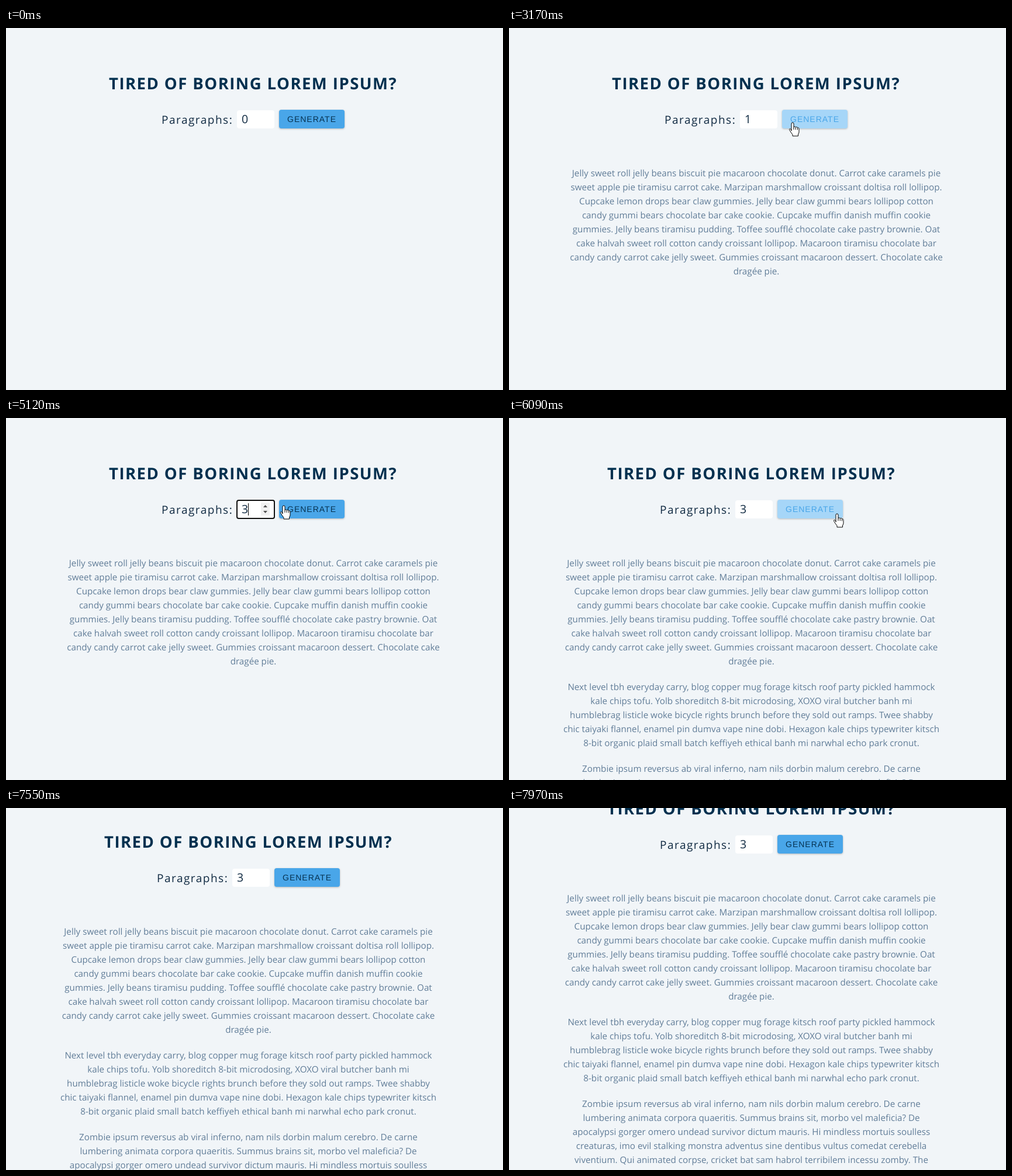
Animation, 850 px wide and 620 px high, one loop 8000 ms. Source, as an HTML page:

```html
<!DOCTYPE html>
<html lang="en">
<head>
<meta charset="utf-8">
<title>Paragraph generator</title>
<style>
  html, body { margin: 0; width: 100%; height: 100%; overflow: hidden; background: #f1f5f8; }
  svg { display: block; width: 850px; height: 620px; background: #f1f5f8; }
  text { font-family: "Open Sans", "Noto Sans", sans-serif; fill: #102a42; text-rendering: geometricPrecision; white-space: pre; }
  .title { font-size: 27.5px; font-weight: 700; letter-spacing: 1.46px; fill: #02304f; }
  .label { font-size: 19px; letter-spacing: 1.5px; }
  .value { font-size: 19.5px; }
  .caption { font: 14px "Liberation Sans", Arial, sans-serif; letter-spacing: 1px; }
  .para text { font-size: 15.2px; fill: #617d98; text-anchor: middle; }
  #button { filter: drop-shadow(0 1px 1.5px rgba(0, 0, 0, .25)); }
  .cursor { fill: #fff; stroke: #000; stroke-width: 1; stroke-linejoin: round; }
</style>
</head>
<body>
<svg viewBox="0 0 850 620">
  <g id="page">
    <text class="title" x="176" y="105">TIRED OF BORING LOREM IPSUM?</text>
    <text class="label" x="266" y="164">Paragraphs:</text>
    <rect x="395" y="141" width="64" height="31" rx="4" fill="#fff"/>
    <text class="value" id="value" x="403" y="163">0</text>
    <g id="spin">
      <rect x="436" y="145" width="15" height="22" fill="#f0f0f0"/>
      <rect id="half" x="436" width="15" height="11" fill="#dcdcdc"/>
      <path d="M440 153l3.5-4 3.5 4zM440 159l3.5 4 3.5-4z" fill="#505050"/>
    </g>
    <g id="focus">
      <rect x="395" y="141" width="64" height="31" rx="3" fill="none" stroke="#101010" stroke-width="2"/>
      <path id="caret" d="M414.5 146v21" stroke="#000"/>
    </g>
    <rect id="button" x="467" y="140" width="112" height="32" rx="4"/>
    <text class="caption" id="caption" x="481" y="161">GENERATE</text>
    <g id="paras"></g>
  </g>
  <circle id="glow" r="12" fill="#ff0" fill-opacity=".58"/>
  <g id="pointer" class="cursor">
    <path id="arrow" d="M.5.5V16.4L4.1 13l2.5 5.6 2.2-1L6.3 12.1H11.4z"/>
    <g id="hand">
      <path d="M-2 14V2a2 2 0 0 1 4 0v6a1.7 1.7 0 0 1 3.3.4 1.7 1.7 0 0 1 3.2.8 1.5 1.5 0 0 1 2.5 1.2V16q0 2-1.5 4v3H0v-2.5q-2.5-3-4.8-7-1.5-2.5 0-3 1.2-.3 2.8 2.5z"/>
      <path d="M2 8v4M5.3 8.6v3.6M8.5 9.4v3" fill="none"/>
    </g>
  </g>
</svg>
<script>
const LOOP = 8000;
const $ = id => document.getElementById(id);

const paragraphs = [
  [254, `Jelly sweet roll jelly beans biscuit pie macaroon chocolate donut. Carrot cake caramels pie
sweet apple pie tiramisu carrot cake. Marzipan marshmallow croissant doltisa roll lollipop.
Cupcake lemon drops bear claw gummies. Jelly bear claw gummi bears lollipop cotton
candy gummi bears chocolate bar cake cookie. Cupcake muffin danish muffin cookie
gummies. Jelly beans tiramisu pudding. Toffee soufflé chocolate cake pastry brownie. Oat
cake halvah sweet roll cotton candy croissant lollipop. Macaroon tiramisu chocolate bar
candy candy carrot cake jelly sweet. Gummies croissant macaroon dessert. Chocolate cake
dragée pie.`],
  [466, `Next level tbh everyday carry, blog copper mug forage kitsch roof party pickled hammock
kale chips tofu. Yolb shoreditch 8-bit microdosing, XOXO viral butcher banh mi
humblebrag listicle woke bicycle rights brunch before they sold out ramps. Twee shabby
chic taiyaki flannel, enamel pin dumva vape nine dobi. Hexagon kale chips typewriter kitsch
8-bit organic plaid small batch keffiyeh ethical banh mi narwhal echo park cronut.`],
  [606, `Zombie ipsum reversus ab viral inferno, nam nils dorbin malum cerebro. De carne
lumbering animata corpora quaeritis. Summus brains sit, morbo vel maleficia? De
apocalypsi gorger omero undead survivor dictum mauris. Hi mindless mortuis soulless
creaturas, imo evil stalking monstra adventus sine dentibus vultus comedat cerebella
viventium. Qui animated corpse, cricket bat sam habrol terribilem incessu zomby. The`]
];

const NS = "http://www.w3.org/2000/svg";
function add(parent, tag, attrs, content = "") {
  const el = document.createElementNS(NS, tag);
  for (const key in attrs) el.setAttribute(key, attrs[key]);
  el.textContent = content;
  return parent.appendChild(el);
}

const blocks = paragraphs.map(([top, copy]) => {
  const block = add($("paras"), "g", { class: "para" });
  copy.split("\n").forEach((line, i) => add(block, "text", { x: 423, y: top + 24 * i }, line));
  return block;
});

// Pointer moves: first step, last step, step count, end point, optional bend
const START = [705, 511];
const moves = [
  [130, 200, 2, 571, 313],
  [460, 540, 2, 473, 192],
  [720, 920, 4, 450, 156],
  [1060, 1350, 5, 445, 155],
  [2080, 2500, 7, 487, 160],
  [3170, 3170, 1, 485, 162],
  [3240, 3930, 10, 443, 158, 478, 200],
  [3990, 4190, 4, 443, 152],
  [5120, 5120, 1, 475, 150],
  [5190, 5470, 5, 484, 155],
  [6090, 6350, 5, 870, 199]
];
const clicks = [[1760, 1820], [2680, 2750], [4460, 4520], [4660, 4720], [5650, 5720]];
const hovers = [[2290, 3317], [5120, 6155]];
const focuses = [[1820, 2750], [4520, 5720]];

const clamp = v => Math.max(0, Math.min(1, v));
const within = (t, [a, b]) => t >= a && t < b;
const show = (id, on) => { $(id).style.display = on ? "" : "none"; };
const mix = (a, b, u) => `rgb(${a.map((v, i) => Math.round(v + (b[i] - v) * u))})`;

function pointerAt(t) {
  let [x, y] = START;
  for (const [t0, t1, n, ex, ey, bx = (x + ex) / 2, by = (y + ey) / 2] of moves) {
    if (t < t0) break;
    const k = n > 1 ? Math.floor((t - t0) / (t1 - t0) * (n - 1) + 1e-6) : 0;
    const u = Math.min(1, (k + 1) / n), v = 1 - u;
    x = v * v * x + 2 * u * v * bx + u * u * ex;
    y = v * v * y + 2 * u * v * by + u * u * ey;
  }
  return [Math.round(x), Math.round(y)];
}

function scrollAt(t) {
  if (t < 7280) return 0;
  const k = Math.min(10, Math.floor((t - 7272) / 69));
  return k <= 4 ? 1 + 9 * k : 37 + 9.5 * (k - 4);
}

function draw(t) {
  const full = t >= 5720;
  const dx = full ? -8 : 0;
  $("page").setAttribute("transform", `translate(${dx} ${-scrollAt(t)})`);
  $("paras").setAttribute("transform", `translate(${full ? -0.5 : 0} 0)`);
  blocks.forEach((b, i) => { b.style.display = (i ? full : t >= 2750) ? "" : "none"; });
  $("value").textContent = [1820, 4520, 4720].filter(c => t >= c).length;

  const [x, y] = pointerAt(t);
  const px = x - dx;
  const seen = t >= 130 && x < 850;
  const onButton = px >= 467 && px < 579 && y >= 140 && y < 172;
  const onInput = seen && px >= 395 && px < 459 && y >= 141 && y < 172;
  const focus = focuses.some(f => within(t, f));

  show("focus", focus);
  const since = t < 4000 ? t - 1820 : t < 4720 ? t - 4520 : t - 4720;
  show("caret", since % 1060 < 530);
  show("spin", focus || onInput);
  show("half", onInput && px >= 436 && px < 451);
  $("half").setAttribute("y", y < 156 ? 145 : 156);

  const hover = hovers.reduce((sum, [a, b]) => sum + clamp((t - a) / 200) - clamp((t - b) / 200), 0);
  $("button").style.fill = mix([73, 166, 233], [166, 214, 248], hover);
  $("caption").style.fill = mix([6, 50, 81], [73, 166, 233], hover);

  show("pointer", seen);
  show("hand", onButton);
  show("arrow", !onButton);
  $("pointer").setAttribute("transform", `translate(${x} ${y})`);
  show("glow", clicks.some(c => within(t, c)));
  $("glow").setAttribute("cx", x);
  $("glow").setAttribute("cy", y);
}

const begin = performance.now();
function tick() {
  draw((performance.now() - begin) % LOOP);
  requestAnimationFrame(tick);
}
tick();
</script>
</body>
</html>
```
